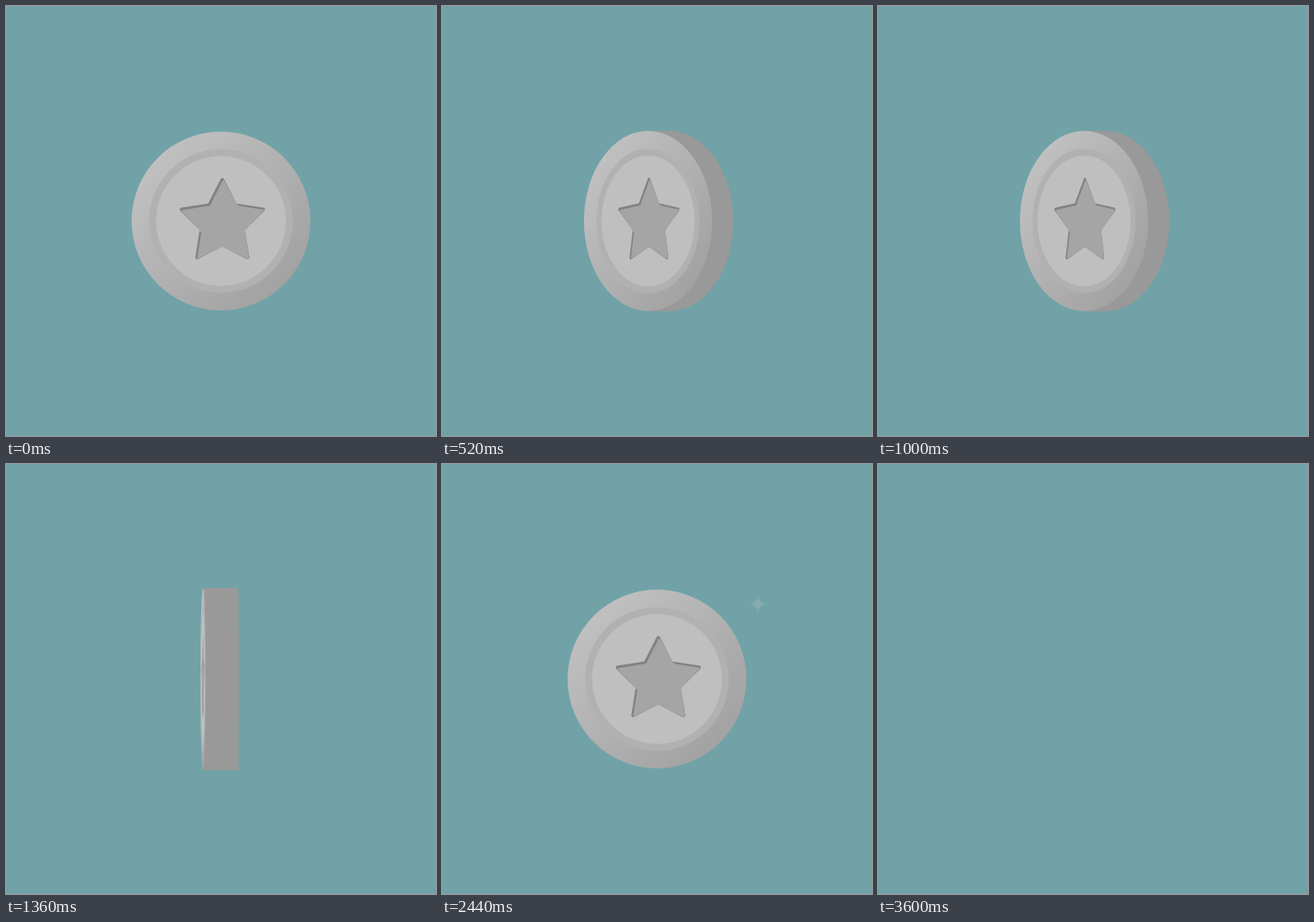
An HTML page with a canvas for the animation above (3.62 s loop, 500 px wide and 500 px high).

```html
<!DOCTYPE html>
<html lang="en">
<head>
<meta charset="utf-8">
<title>Spinning coin</title>
<style>
  html, body { margin: 0; width: 100%; height: 100%; overflow: hidden; background: #70a2a7; }
  canvas { display: block; width: 100vw; height: 100vh; }
</style>
</head>
<body>
<canvas id="stage" width="500" height="500"></canvas>
<script>
const ctx = document.getElementById('stage').getContext('2d');
const LOOP = 3620, SPIN = 1760, RAMP = 320, SPEED = 0.375;
const RADIUS = 104, TAU = Math.PI * 2;

const rim = ctx.createLinearGradient(-74, -74, 74, 74);
rim.addColorStop(0, '#c0c0c0');
rim.addColorStop(1, '#a2a2a2');

const star = new Path2D();
for (let i = 0; i < 10; i++) {
  const r = i % 2 ? 25.5 : 50, a = i * TAU / 10;
  star.lineTo(1.5 + r * Math.sin(a), 2 - r * Math.cos(a));
}
star.closePath();

// Degrees turned: speeds up, runs evenly, slows down to three half turns.
function spinAngle(t) {
  if (t >= SPIN) return 540;
  if (t > SPIN / 2) return 540 - spinAngle(SPIN - t);
  return SPEED * (t < RAMP ? t * t / (2 * RAMP) : t - RAMP / 2);
}

function ellipse(x, rx, ry, fill) {
  ctx.beginPath();
  ctx.ellipse(x, 0, rx, ry, 0, 0, TAU);
  ctx.fillStyle = fill;
  ctx.fill();
}

function roundStar(color) {
  ctx.fillStyle = ctx.strokeStyle = color;
  ctx.lineWidth = 4;
  ctx.lineJoin = 'round';
  ctx.fill(star);
  ctx.stroke(star);
}

function drawStar() {
  roundStar('#828282');
  ctx.save();
  ctx.beginPath();
  // The sunken floor is shifted, leaving a shadow along the upper left walls.
  const clip = new Path2D(star);
  for (let i = 0; i < 10; i++) {
    const r = i % 2 ? 27.8 : 52.5, a = i * TAU / 10;
    ctx.lineTo(1.5 + r * Math.sin(a), 2 - r * Math.cos(a));
  }
  ctx.closePath();
  ctx.clip();
  ctx.translate(2, 2.6);
  roundStar('#a5a5a5');
  ctx.restore();
}

function drawCoin(t) {
  const turned = spinAngle(t);
  const angle = turned - 180 * Math.ceil(turned / 180 - 0.5 - 1e-6);
  const tilt = angle / 90, rad = angle * Math.PI / 180;
  const lean = Math.abs(tilt), squash = Math.cos(rad);
  const front = 21 * tilt, back = -20 * Math.sin(rad);

  if (lean > 0.001) {
    const height = RADIUS + 2 * lean;
    ellipse(back, height * squash, height, '#999');
    ctx.fillRect(Math.min(front, back), -height, Math.abs(front - back), 2 * height);
  }

  ctx.save();
  ctx.translate(front, 0);
  const grow = 1 + 0.014 * lean;
  ctx.scale(Math.max(0.03, squash * grow), grow);
  ellipse(0, RADIUS, RADIUS, rim);
  ellipse(0, 83.5, 83.5, '#b1b1b1');
  ellipse(0, 75.5, 75.5, '#bfbfbf');
  drawStar();
  ctx.restore();
}

function drawShine(t, start) {
  const age = t - start, width = 56;
  if (age < 0 || age > 420) return;
  const lead = 109.5 - 0.65 * age;
  ctx.save();
  ctx.beginPath();
  ctx.arc(0, 0, RADIUS, 0, TAU);
  ctx.clip();
  ctx.rotate(40 * Math.PI / 180);
  ctx.fillStyle = 'rgba(255,255,255,.5)';
  ctx.fillRect(-150, lead, 300, width);
  ctx.restore();
}

function drawSparkle(t, start, x, y) {
  const p = (t - start) / 480;
  if (p <= 0 || p >= 1) return;
  const glow = Math.sin(Math.PI * p), r = 15.5 * (0.5 + 0.5 * glow);
  ctx.save();
  ctx.translate(x, y);
  ctx.globalAlpha = glow;
  ctx.fillStyle = '#c6c6c6';
  ctx.beginPath();
  ctx.moveTo(r, 0);
  for (let i = 1; i <= 4; i++) {
    const a = i * TAU / 4, mid = a - TAU / 8;
    ctx.quadraticCurveTo(r * 0.2 * Math.cos(mid), r * 0.2 * Math.sin(mid),
      r * Math.cos(a), r * Math.sin(a));
  }
  ctx.fill();
  ctx.restore();
}

function draw(now) {
  const t = now % LOOP;
  ctx.setTransform(1, 0, 0, 1, 0, 0);
  ctx.fillStyle = '#70a2a7';
  ctx.fillRect(0, 0, 500, 500);
  if (t < 3600) {
    ctx.translate(250, 250);
    drawCoin(t);
    drawShine(t, 1900);
    drawShine(t, 2960);
    drawSparkle(t, 2400, 117.5, -87);
    drawSparkle(t, 2920, -121.5, 86);
  }
}

const began = performance.now();
function tick() {
  draw(performance.now() - began);
  requestAnimationFrame(tick);
}
tick();
</script>
</body>
</html>
```
